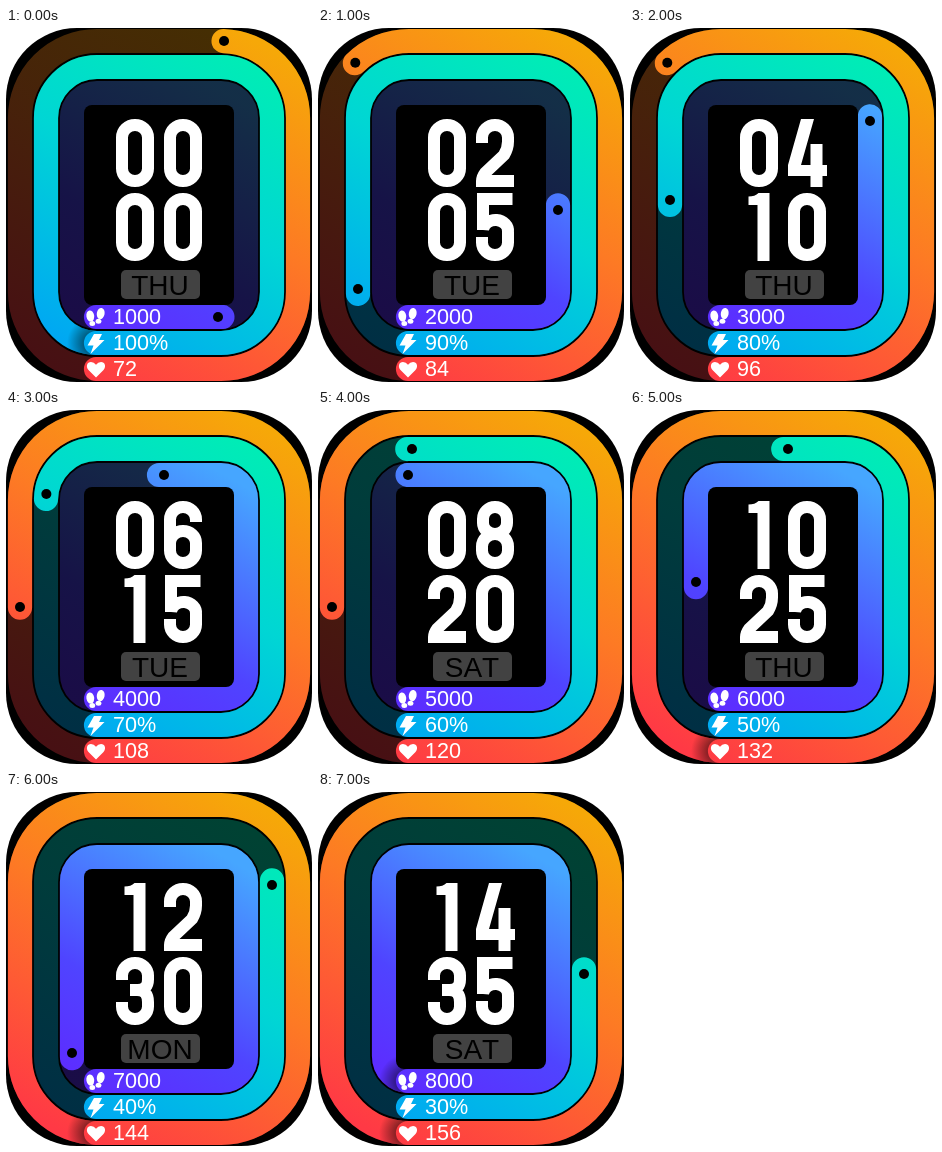
These frames come from a looping animation (306x354 px, 8000 ms). An HTML page:

```html
<!DOCTYPE html>
<html lang="en">
<head>
<meta charset="utf-8">
<title>Watch face</title>
<style>
html, body { margin: 0; width: 100%; height: 100%; overflow: hidden; background: #fff; }
svg { display: block; width: 306px; height: 354px; }
text { font-family: "Liberation Sans", Arial, sans-serif; font-kerning: none; }
</style>
</head>
<body>
<svg id="face" viewBox="0 0 306 354">
  <defs id="defs"></defs>
  <rect width="306" height="354" rx="71"/>
  <g id="rings" fill="none" stroke-width="24.2"></g>
  <rect x="78" y="77" width="150" height="200" rx="8"/>
  <g id="digits"></g>
  <rect x="115" y="242" width="79" height="29" rx="5" fill="#424242"/>
  <text id="day" x="154" y="266.500" font-size="28" text-anchor="middle"></text>
  <g fill="#fff">
    <ellipse cx="84.300" cy="288" rx="3.900" ry="5.600" transform="rotate(-10 84.3 288)"/>
    <ellipse cx="86.300" cy="295.500" rx="2.900" ry="2.500"/>
    <ellipse cx="94.700" cy="285.500" rx="3.900" ry="5.600" transform="rotate(10 94.7 285.5)"/>
    <ellipse cx="92.500" cy="293.200" rx="2.900" ry="2.500"/>
    <path d="M88 306H96L93 312H98.500L84.500 326L87.500 317.500H81.500Z"/>
    <path d="M90 349.500L82.500 342C79.500 338.500 81 334 85 334Q88 334 90 336.800Q92 334 95 334C99 334 100.500 338.500 97.500 342Z"/>
  </g>
  <g id="labels" fill="#fff" font-size="21.600"></g>
</svg>
<script>
const NS = "http://www.w3.org/2000/svg";
const $ = id => document.getElementById(id);

function add(parent, tag, attrs) {
  const el = document.createElementNS(NS, tag);
  for (const k in attrs) el.setAttribute(k, attrs[k]);
  parent.appendChild(el);
  return el;
}

const BOTTOM = 0, RIGHT = 1, TOP = 2, LEFT = 3;
const START = 90;

// Each level: [side, coordinate of the cap centre, distance of the dot behind it]; null is a full ring.
const far = 4.5;
const upper = [RIGHT, 88.5, far], lower = [RIGHT, 177.5, far];
const half = [TOP, 153.5, far];
const left = [LEFT, 176.5, far], leftEnd = [LEFT, 265.5, far];
const corner = [TOP, 31.5, 0], side = [LEFT, 197, 0];

const rings = [
  { inset: 0, span: 190, stops: ["#ff3945", "#fd7a24", "#f6a808"], mid: 0.56,
    levels: [[TOP, 218, 0], corner, corner, side, side, null, null, null],
    label: i => 72 + 12 * i },
  { inset: 26, span: 165, stops: ["#00a8f2", "#00d6d4", "#00ecb6"], mid: 0.55,
    levels: [null, leftEnd, left, [LEFT, 88.5, far], [TOP, 89.5, far], half, upper, lower],
    label: i => 100 - 10 * i + "%" },
  { inset: 52, span: 130, stops: ["#5c2eff", "#4f44ff", "#46a6ff"], mid: 0.35,
    levels: [[BOTTOM, 216.5, far], lower, upper, half, [TOP, 90, 0], left, leftEnd, null],
    label: i => 1000 * (i + 1) }
];

function makeRing(ring, n) {
  const { inset, span } = ring;
  const x0 = 14 + inset, x1 = 292 - inset, y0 = 13 + inset, y1 = 341 - inset, r = 77 - inset;

  const grad = add($("defs"), "linearGradient", {
    id: "hue" + n, gradientUnits: "userSpaceOnUse",
    x1: 153 - span * 0.5, y1: 177 + span * 0.866,
    x2: 153 + span * 0.5, y2: 177 - span * 0.866
  });
  ring.stops.forEach((c, i) =>
    add(grad, "stop", { offset: [0, ring.mid, 1][i], "stop-color": c }));

  const shade = add($("defs"), "radialGradient", {
    id: "shade" + n, gradientUnits: "userSpaceOnUse", cx: 88, cy: y1, r: 27
  });
  add(shade, "stop", { offset: 0.4, "stop-color": "#000", "stop-opacity": 0.45 });
  add(shade, "stop", { offset: 1, "stop-color": "#000", "stop-opacity": 0 });

  const arc = (x, y) => `A${r} ${r} 0 0 0 ${x} ${y}`;
  const d = `M${START} ${y1}H${x1 - r}${arc(x1, y1 - r)}V${y0 + r}${arc(x1 - r, y0)}` +
    `H${x0 + r}${arc(x0, y0 + r)}V${y1 - r}${arc(x0 + r, y1)}Z`;
  const stroke = `url(#hue${n})`, g = $("rings");
  add(g, "path", { d, stroke, opacity: 0.28 });
  ring.bar = add(g, "path", { d, stroke, "stroke-linecap": "round" });
  ring.seam = add(g, "g", {});
  add(ring.seam, "path", { d, stroke: `url(#shade${n})` });
  add(ring.seam, "path", { d: `M${START} ${y1}H130L130 ${y1 + 0.01}`, stroke, "stroke-linecap": "round" });
  ring.dot = add(g, "circle", { r: 5, fill: "#000" });
  ring.text = add($("labels"), "text", { x: 107, y: y1 + 6.5 });

  const turn = Math.PI * r / 2;
  const toRight = x1 - r - START + turn;
  const toTop = toRight + y1 - y0 - 2 * r + turn;
  const toLeft = toTop + x1 - x0 - 2 * r + turn;
  ring.distance = (edge, v) => [
    v - START,
    toRight + y1 - r - v,
    toTop + x1 - r - v,
    toLeft + v - y0 - r
  ][edge];
}

function setRing(ring, i) {
  const level = ring.levels[i];
  ring.text.textContent = ring.label(i);
  ring.seam.style.display = level ? "none" : "";
  ring.dot.style.display = level ? "" : "none";
  if (!level) {
    ring.bar.removeAttribute("stroke-dasharray");
    return;
  }
  const s = ring.distance(level[0], level[1]);
  const p = ring.bar.getPointAtLength(s - level[2]);
  ring.bar.setAttribute("stroke-dasharray", s + " 9999");
  ring.dot.setAttribute("cx", p.x);
  ring.dot.setAttribute("cy", p.y);
}

// Condensed numerals in a 38 x 68 box; 1 and 4 are filled, the rest stroked.
const glyphs = {
  0: "M6 18.500a13 12.500 0 0 1 26 0v31a13 12.500 0 0 1-26 0z",
  1: "M29.500 0V68H17.500V12H8.500V3.500Q15 3.500 18.500 0Z",
  2: "M6 24v-5.500a13 12.500 0 0 1 26 0v4q0 7-4 13.500L9 54Q6 58 6 62H38",
  3: "M6 23v-4.500a13 12.500 0 0 1 26 0v4q0 10-10 10.500H14M21 33q11 0 11 12V49.500a13 12.500 0 0 1-26 0v-4.500",
  4: "M13 0H26L13 46H22.500V25H34.500V46H39V57H34.500V68H22.500V57H0V46Z",
  5: "M36.500 6H7V37M7 37a12.500 11 0 0 1 25 2V49.500a13 12.500 0 0 1-26 0v-5.500",
  6: "M32 21v-2.500a13 12.500 0 0 0-26 0v31a13 12.500 0 0 0 26 0v-7.500a13 12 0 0 0-26 0",
  8: "M7 18a12 12 0 0 1 24 0v4a12 11 0 0 1-24 0zM6 45.500a13 12.500 0 0 1 26 0v4a13 12.500 0 0 1-26 0z"
};
const cells = [[110, 91], [158, 91], [110, 165], [158, 165]].map(([x, y]) =>
  add($("digits"), "path", { transform: `translate(${x} ${y})`, "stroke-width": 12 }));

function setDigit(cell, c) {
  const solid = c === "1" || c === "4";
  cell.setAttribute("d", glyphs[c]);
  cell.setAttribute("fill", solid ? "#fff" : "none");
  cell.setAttribute("stroke", solid ? "none" : "#fff");
}

const days = ["THU", "TUE", "THU", "TUE", "SAT", "THU", "MON", "SAT"];
const two = n => String(n).padStart(2, "0");
let shown = -1;

function draw(ms) {
  const i = Math.floor(ms / 1000) % 8;
  if (i === shown) return;
  shown = i;
  const time = two(i * 2) + two(i * 5);
  cells.forEach((cell, k) => setDigit(cell, time[k]));
  $("day").textContent = days[i];
  rings.forEach(ring => setRing(ring, i));
}

rings.forEach(makeRing);
draw(0);
const begin = performance.now();
function tick() {
  draw(performance.now() - begin);
  requestAnimationFrame(tick);
}
requestAnimationFrame(tick);
</script>
</body>
</html>
```
